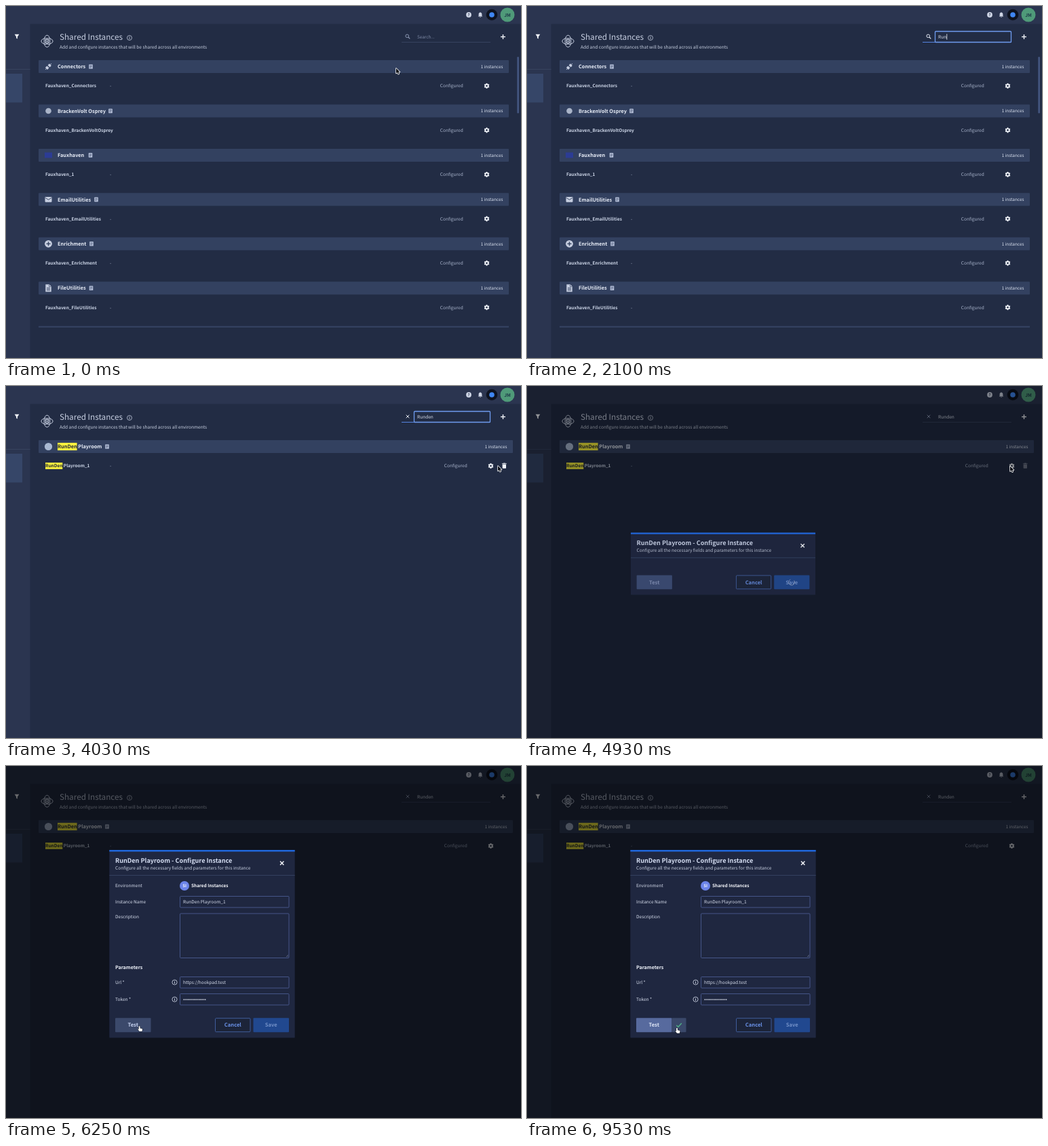
Recreate the animation shown at these times as an HTML page with a canvas. Size 759 by 520 pixels, loop 9.56 s.

```html
<!DOCTYPE html>
<html lang="en">
<head>
<meta charset="utf-8">
<title>Shared instances</title>
<style>
html, body { margin: 0; width: 100%; height: 100%; overflow: hidden; background: #222c44; }
canvas { display: block; }
</style>
</head>
<body>
<canvas id="stage" width="759" height="520"></canvas>
<script>
const ctx = document.getElementById('stage').getContext('2d');
const LOOP = 9560;
const FAMILY = '"Noto Sans CJK SC", "Noto Sans CJK JP", "Noto Sans", sans-serif';
const PANEL = '#222c44', BAR = '#2b3550', ROW = '#334160', PALE = '#c6cee0', BLUE = '#5684e0';
const QUERY = 'Runden', PRODUCT = 'RunDen Playroom';

// Key moments in ms
const FOCUS = 1200, TYPE = 1700, STEP = 150, FILTER = 2800, CLICK = 4600, SHADE = 4720, OPEN = 4800,
  LOADED = 5250, TEST = 6350, PASSED = 7850, READY = 8400;

// Pointer path: time, x, y
const PATH = [[150, 575, 92], [850, 655, 45], [3000, 655, 45], [3850, 729, 117], [4030, 725, 118],
  [4350, 712, 118.5], [5250, 712, 118.5], [5880, 202, 380], [6250, 196.6, 384.3], [8700, 196.2, 384.3], [9150, 221, 387]];

const clamp = v => Math.min(1, Math.max(0, v));

function pointerAt(t) {
  const i = PATH.findIndex(k => k[0] > t);
  if (i < 0) return PATH[PATH.length - 1].slice(1);
  if (i === 0) return PATH[0].slice(1);
  const [a, b] = [PATH[i - 1], PATH[i]];
  const p = (t - a[0]) / (b[0] - a[0]), e = p * p * (3 - 2 * p);
  return [a[1] + (b[1] - a[1]) * e, a[2] + (b[2] - a[2]) * e];
}

// Drawing helpers
function rect(x, y, w, h, fill, r = 0) {
  ctx.fillStyle = fill;
  ctx.beginPath();
  ctx.roundRect(x, y, w, h, r);
  ctx.fill();
}
function box(x, y, w, h, color, width = 1, r = 1) {
  ctx.strokeStyle = color;
  ctx.lineWidth = width;
  ctx.beginPath();
  ctx.roundRect(x, y, w, h, r);
  ctx.stroke();
}
function line(color, width, ...pts) {
  ctx.strokeStyle = color;
  ctx.lineWidth = width;
  ctx.beginPath();
  for (let i = 0; i < pts.length; i += 2) ctx.lineTo(pts[i], pts[i + 1]);
  ctx.stroke();
}
function disc(x, y, r, fill) {
  ctx.fillStyle = fill;
  ctx.beginPath();
  ctx.arc(x, y, r, 0, 7);
  ctx.fill();
}
function ring(x, y, rx, color, width, ry = rx, from = 0, to = Math.PI * 2) {
  ctx.strokeStyle = color;
  ctx.lineWidth = width;
  ctx.beginPath();
  ctx.ellipse(x, y, rx, ry, 0, from, to);
  ctx.stroke();
}
function shape(x, y, d, fill, stroke, width = 0.8, scale = 1) {
  const path = new Path2D(d);
  ctx.save();
  ctx.translate(x, y);
  ctx.scale(scale, scale);
  if (stroke) {
    ctx.strokeStyle = stroke;
    ctx.lineWidth = width;
    ctx.lineJoin = 'round';
    ctx.stroke(path);
  }
  ctx.fillStyle = fill;
  ctx.fill(path);
  ctx.restore();
}
// y is the middle of the capitals
function text(s, x, y, color = PALE, size = 6.56, weight = 'normal', align = 'left') {
  ctx.font = `${weight} ${size}px ${FAMILY}`;
  ctx.textRendering = 'geometricPrecision';
  ctx.textAlign = align;
  ctx.fillStyle = color;
  ctx.fillText(s, x, y + size * 0.365);
  return ctx.measureText(s).width;
}
const bold = (s, x, y, color, size = 6.5, align) => text(s, x, y, color, size, 'bold', align);

// Icons
function cross(x, y, r, color, width) {
  line(color, width, x - r, y - r, x + r, y + r);
  line(color, width, x - r, y + r, x + r, y - r);
}
function plus(x, y, r, color, width) {
  line(color, width, x - r, y, x + r, y);
  line(color, width, x, y - r, x, y + r);
}
function info(x, y, r, color) {
  ring(x, y, r, color, 0.8);
  line(color, 0.9, x, y - 0.6, x, y + r * 0.55);
  line(color, 0.9, x, y - r * 0.55, x, y - r * 0.3);
}
function gear(x, y, color) {
  ring(x, y, 2.2, color, 1.7);
  for (let i = 0; i < 6; i++) {
    const a = (i + 0.5) * Math.PI / 3, c = Math.cos(a), s = Math.sin(a);
    line(color, 1.8, x + c * 2.2, y + s * 2.2, x + c * 3.9, y + s * 3.9);
  }
}
function trash(x, y, color) {
  rect(x - 2.7, y - 2.2, 5.4, 6, color, 0.7);
  rect(x - 3.4, y - 3.7, 6.8, 1, color);
  rect(x - 1.4, y - 4.3, 2.8, 1, color);
}
function note(x, y) {
  rect(x - 2.8, y - 3.3, 5.6, 6.6, '#b4bfd8', 0.6);
  for (const d of [-1.5, 0, 1.5]) line(ROW, 0.6, x - 1.7, y + d, x + (d > 1 ? 0.6 : 1.7), y + d);
}
function spinner(x, y, t) {
  const a = t / 160;
  ring(x, y, 4.4, '#8b98b8', 1, 4.4, a, a + 4.9);
}
const ICONS = {
  plug(x, y) {
    ctx.save();
    ctx.translate(x, y);
    ctx.rotate(-Math.PI / 4);
    rect(-4.4, -2.2, 3.6, 4.4, PALE, 1);
    rect(0.8, -2.2, 3.4, 4.4, PALE, 1);
    line(PALE, 0.9, -6.4, 0, -4, 0);
    line(PALE, 0.9, 4, 0, 6.4, 0);
    line(PALE, 0.7, -1, -1, 0.4, -1);
    line(PALE, 0.7, -1, 1, 0.4, 1);
    ctx.restore();
  },
  grey: (x, y) => disc(x, y, 4.3, '#aab4c8'),
  blue: (x, y) => rect(x - 5.5, y - 4, 11, 8, '#2c3c94'),
  mail(x, y) {
    rect(x - 5, y - 3.8, 10, 7.6, PALE, 0.8);
    line(ROW, 0.9, x - 4.6, y - 2.6, x, y + 0.4, x + 4.6, y - 2.6);
  },
  add(x, y) {
    disc(x, y, 5.4, PALE);
    plus(x, y, 3, ROW, 1.4);
  },
  file(x, y) {
    shape(x, y, 'M-4.2-5.4H1.3L4.2-2.4V5.4H-4.2Z', PALE);
    line(ROW, 0.7, x + 1, y - 5, x + 1, y - 2.2, x + 4, y - 2.2);
    for (const d of [-0.4, 1.4, 3.2]) line(ROW, 0.8, x - 2.5, y + d, x + 2.5, y + d);
  }
};
const LIST = [
  ['Connectors', 'plug', 125], ['BrackenVolt Osprey', 'grey', 154], ['Fauxhaven', 'blue', 124.5],
  ['EmailUtilities', 'mail', 133], ['Enrichment', 'add', 126], ['FileUtilities', 'file', 125.5]
];

function chrome() {
  rect(0, 0, 759, 520, BAR);
  rect(35.5, 26.5, 724, 494, PANEL);
  rect(0, 93, 35.5, 1, '#37435f');
  rect(0, 100, 24, 42.5, '#364668');
  shape(16, 45, 'M-3.4-3.2H3.4L.9.4V3.4L-.9 2.4V.4Z', '#f2f5fb');

  disc(682, 13, 3.9, '#cfd6e6');
  bold('?', 682, 13, BAR, 5.6, 'center');
  shape(699, 13, 'M-3.2 2.4L-2.4 1.4V-.8C-2.4-2.6-1.3-3.4 0-3.8C1.3-3.4 2.4-2.6 2.4-.8V1.4L3.2 2.4ZM-1 3H1L0 4Z', '#cfd6e6');
  disc(716, 13, 8.3, '#0e1320');
  disc(716, 13, 3.8, '#3f86f2');
  disc(739, 13, 10.5, '#4f9a79');
  bold('JM', 739, 13.2, '#1f3a48', 6.8, 'center');

  ring(60.5, 52, 8.6, PALE, 1, 4.6);
  ring(60.5, 52, 4.6, PALE, 1, 8.8);
  disc(60.5, 52, 4.4, PANEL);
  ring(60.5, 52, 3, PALE, 1.3);
  disc(60.5, 52, 1.2, PALE);
  text('Shared Instances', 79, 46, PALE, 11.74);
  info(182, 47, 3.5, PALE);
  text('Add and configure instances that will be shared across all environments', 79, 60.3, '#cbd3e4');
  plus(732.5, 45.5, 3.5, '#f2f5fb', 1.4);
}

function search(t) {
  const focused = t >= FOCUS && t < CLICK;
  const typed = QUERY.slice(0, Math.max(0, Math.floor((t - TYPE) / STEP) + 1));
  const iconColor = focused ? '#e6ebf6' : '#8d99b5';
  if (t >= FILTER) cross(592, 45, 2.3, iconColor, 1);
  else {
    ring(591.2, 44.3, 2.3, iconColor, 1);
    line(iconColor, 1.2, 592.9, 46, 595.3, 48.4);
  }
  rect(583, 53, 131, 1, focused ? BLUE : '#36425f');
  if (focused) box(601.5, 37.5, 112, 16, '#6f9cf0', 1.3);
  const w = typed ? text(typed, 606, 45.5, '#d8dfee') : 0;
  if (!typed) text('Search...', 606, 45.5, '#7e8aa6', 6.4);
  const typedAll = TYPE + STEP * 5;
  if (focused && (t < typedAll || Math.floor((t - typedAll) / 500) % 2 === 0))
    rect(606.3 + w, 41.3, 0.8, 8.5, '#f2f5fb');
}

function entryRight(y, right) {
  text('1 instances', right - 8.5, y, '#dde4f1', 6.4, 'normal', 'right');
  text('Configured', right - 101.2, y + 28.5, '#a9b4cc');
  gear(right - 32.5, y + 28.5, '#f2f5fb');
  text('-', 153, y + 28.5, '#a9b4cc');
}
function fullList() {
  LIST.forEach(([name, icon, noteX], i) => {
    const y = 89.5 + i * 65.45;
    rect(48, y - 9.5, 693, 19, ROW, 1);
    ICONS[icon](62.5, y);
    bold(name, 76, y, '#e9eef8', 7.35);
    note(noteX, y);
    bold('Fauxhaven_' + (i === 2 ? '1' : name.replace(' ', '')), 58, y + 28.5, '#ccd5e7');
    entryRight(y, 741);
  });
  rect(48, 472.7, 693, 2.3, ROW);
  rect(753.3, 75, 2.7, 83.5, '#43557f', 1.3);
}
function marked(s, x, y, size, half, color) {
  ctx.font = `bold ${size}px ${FAMILY}`;
  ctx.textRendering = 'geometricPrecision';
  const w = ctx.measureText(s.slice(0, 6)).width;
  rect(x, y - half, w, half * 2, '#fbf23e');
  bold(s.slice(0, 6), x, y, '#222833', size);
  bold(s.slice(6), x + w, y, color, size);
}
function filteredList(t) {
  rect(48, 80, 699, 19, ROW, 1);
  disc(62.5, 89.5, 5.6, '#a9b9d2');
  marked(PRODUCT, 76, 89.5, 7.35, 5.6, '#e9eef8');
  note(149, 89.5);
  marked(PRODUCT + '_1', 58, 118, 6.5, 4.8, '#ccd5e7');
  entryRight(89.5, 747);
  if (t > 3550) {
    ctx.globalAlpha = clamp((OPEN + 240 - t) / 300);
    trash(734.3, 118, '#f2f5fb');
    ctx.globalAlpha = 1;
  }
}

function button(label, x, y, w, fill, color, border) {
  rect(x, y, w, 21, fill, 1);
  if (border) box(x + 0.5, y + 0.5, w - 1, 20, border, 0.9);
  bold(label, x + w / 2, y + 10.5, color, 7.6, 'center');
}
function field(y, h, value) {
  box(256.5, y + 0.5, 160.5, h, '#4a5b90', 0.9);
  if (value) text(value, 261, y + h / 2 + 0.5, '#d8dfee');
}
function form() {
  const label = '#d8dfee';
  text('Environment', 161, 177, label);
  disc(263, 177, 7, '#6c84e9');
  bold('SI', 263, 177.2, '#f2f5fb', 6, 'center');
  bold('Shared Instances', 273, 177, '#f7f9fd');
  text('Instance Name', 161, 201, label);
  field(192, 16.5, PRODUCT + '_1');
  text('Description', 161, 222.5, label);
  field(217.5, 65.5);
  line('#8793b3', 0.6, 413, 282, 416, 279);
  line('#8793b3', 0.6, 415, 282, 416, 281);
  bold('Parameters', 161, 297.5, '#eef2fa', 7.15);
  text('Url *', 161, 319.7, label);
  info(248.5, 319.5, 3.6, label);
  field(311, 16.5, 'https://hookpad.test');
  text('Token *', 161, 345, label);
  info(248.5, 344.7, 3.6, label);
  field(336, 16.5);
  for (let i = 0; i < 15; i++) disc(262.2 + i * 2.25, 345, 0.85, '#e4eaf6');
}
function dialog(t, pointer) {
  const loaded = t >= LOADED;
  const [top, bottom] = loaded ? [124, 401.5] : [216.3, 308.8];
  const p = clamp((t - OPEN) / 150), scale = 0.7 + 0.3 * (1 - (1 - p) ** 2);
  ctx.save();
  ctx.globalAlpha = p;
  ctx.translate(289, 262.5);
  ctx.scale(scale, scale);
  ctx.translate(-289, -262.5);

  rect(152.3, top, 273.4, bottom - top, '#1f2740', 1);
  rect(152.3, top, 273.4, 2.4, '#2067dc');
  bold(PRODUCT + ' - Configure Instance', 161, top + 15.3, '#d5def2', 9.1);
  text('Configure all the necessary fields and parameters for this instance', 161, top + 26.6, '#cbd3e4');
  cross(406.7, top + 19.5, 2.7, '#f7f9fd', 1.4);
  rect(152.3, top + 37, 273.4, 0.9, '#34405f');
  if (loaded) form();

  const y = bottom - 29.3;
  const over = pointer[0] < 234 && pointer[1] > y;
  const overTest = over && pointer[0] < 213;
  const disabled = !loaded || (t >= TEST && t < READY);
  button('Test', 161, y, 52.5, disabled ? '#3d4d75' : overTest ? '#3b496b' : '#576a9e',
    disabled ? '#8390b3' : overTest ? '#c8d4f2' : '#e2e9f8');
  if (t >= TEST && t < PASSED) spinner(187, y + 10.5, t);
  if (t >= PASSED) {
    rect(213.5, y, 21, 21, over && !overTest ? '#3a486a' : '#566ca6', 1);
    line('#4fae84', 1.4, 220.3, y + 10.7, 222.8, y + 13.2, 227.8, y + 7.8);
  }
  button('Cancel', 308, y, 52.5, '#1c2439', '#6b93ea', '#4464a8');
  button('Save', 364.5, y, 52.5, '#21488f', '#7391c8');
  if (!loaded) spinner(390.5, y + 10.5, t);
  ctx.restore();
}

const ARROW = 'M0 0V7.6L1.8 6L3 8.7L4.3 8.1L3.1 5.5H5.5Z';
const HAND = 'M0 0C.8 0 1 .6 1 1V3.5L4 4.2C4.8 4.4 5 5 4.9 5.7L4.3 8.6H0L-2.6 5.3C-2.3 4.5-1.6 4.7-1 5.3V1C-1 .5-.7 0 0 0Z';
function cursor(t, [x, y]) {
  if (t > 1600 && t < 2950) return;
  const inSearch = x > 601 && x < 714 && y < 54;
  const onGear = t > 4250 && t < SHADE;
  const onTest = x < 234 && y > 372;
  if (inSearch) {
    line('#f2f5fb', 0.9, x, y - 4, x, y + 4);
    line('#f2f5fb', 0.9, x - 1.5, y - 4, x + 1.5, y - 4);
    line('#f2f5fb', 0.9, x - 1.5, y + 4, x + 1.5, y + 4);
  } else if (onGear || onTest) shape(x, y, HAND, '#ffffff', '#10141f', 1.2, 0.9);
  else shape(x, y, ARROW, '#0b0e16', '#ffffff', 1.5);
}

function draw(t) {
  const pointer = pointerAt(t);
  chrome();
  search(t);
  if (t < FILTER) fullList();
  else filteredList(t);
  const shade = 0.57 * clamp((t - SHADE) / 300);
  if (shade) rect(0, 0, 759, 520, `rgba(0,0,0,${shade})`);
  if (t >= OPEN) dialog(t, pointer);
  cursor(t, pointer);
}

const start = performance.now();
function frame() {
  draw((performance.now() - start) % LOOP);
  requestAnimationFrame(frame);
}
frame();
</script>
</body>
</html>
```
